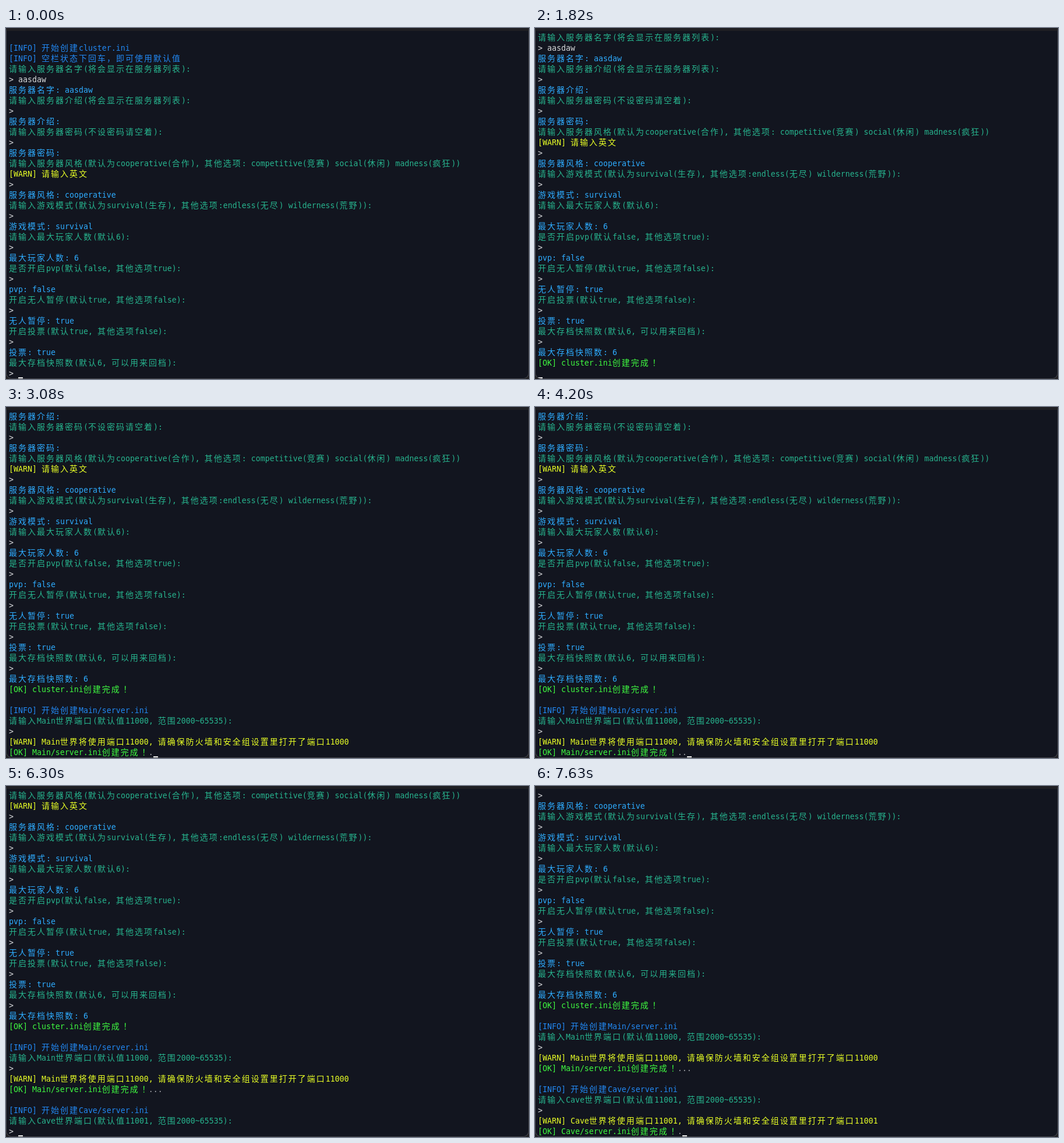
An HTML page for the animation above (8000 ms loop, 898x602 px).

```html
<!DOCTYPE html>
<html lang="zh-CN">
<head>
<meta charset="utf-8">
<style>
  html, body { margin: 0; width: 100%; height: 100%; overflow: hidden; background: #1f1f23; }
  #term {
    position: absolute; left: 0; top: 0; width: 898px; height: 602px; box-sizing: border-box;
    overflow: hidden; background: #12151f; border: 1px solid #43454b; border-top: 5px solid #1f1f23;
    border-radius: 0 0 10px 10px;
  }
  #view { position: absolute; left: 0; top: 3px; width: 896px; height: 594px; overflow: hidden; }
  #log { animation: scroll 8s step-end infinite; }
  .row {
    height: 18px; padding-left: 4px; white-space: pre;
    font: 13.288px/18px "DejaVu Sans Mono", monospace;
  }
  .row span { font: 14px/0 "Noto Sans CJK SC", "Noto Sans CJK", sans-serif; letter-spacing: 2px; }
  .row .mid { font-family: "Noto Sans CJK JP", "Noto Sans CJK", sans-serif; letter-spacing: 0; margin: 0 1px; }
  .row i { font-style: normal; color: #a2a5aa; }
  .info { color: #2288f2; }
  .ask { color: #27b48e; }
  .value { color: #2eacff; }
  .warn { color: #e8ff26; }
  .ok { color: #3ffa40; }
  .input { color: #d9dbdd; }
  #cursor {
    position: absolute; left: 4px; top: 594px; width: 8px; height: 2px; background: #e8e8e8;
    animation: cursor 8s step-end infinite;
  }
  .dot2 { animation: dot2 8s step-end infinite; }
  .dot3 { animation: dot3 8s step-end infinite; }

  @keyframes scroll {
    0% { transform: translateY(0); }
    22.75% { transform: translateY(-54px); }
    35% { transform: translateY(-108px); }
    37.625% { transform: translateY(-144px); }
    78.75% { transform: translateY(-216px); }
    94.5%, 100% { transform: translateY(-252px); }
  }
  @keyframes cursor {
    0% { transform: translateX(16px); }
    22.75% { transform: translateX(0); }
    35% { transform: translateX(16px); }
    37.625% { transform: translateX(248px); }
    52.5% { transform: translateX(256px); }
    65.625% { transform: translateX(264px); }
    78.75% { transform: translateX(16px); }
    94.5%, 100% { transform: translateX(248px); }
  }
  @keyframes dot2 { 0% { opacity: 0; } 52.5%, 100% { opacity: 1; } }
  @keyframes dot3 { 0% { opacity: 0; } 65.625%, 100% { opacity: 1; } }
</style>
</head>
<body>
<div id="term">
  <div id="view"><div id="log"></div></div>
  <div id="cursor"></div>
</div>
<script>
  // The first character of each line picks its colour; the rest is the text.
  const styles = { i: 'info', '?': 'ask', '=': 'value', '!': 'warn', '+': 'ok', '>': 'input' };

  const world = (name, port, dots) => `
i[INFO] 开始创建${name}/server.ini
?请输入${name}世界端口(默认值${port}, 范围2000~65535):
>>
![WARN] ${name}世界将使用端口${port}, 请确保防火墙和安全组设置里打开了端口${port}
+[OK] ${name}/server.ini创建完成！${dots}
`;

  const script = `
i[INFO] 开始创建cluster.ini
i[INFO] 空栏状态下回车，即可使用默认值
?请输入服务器名字(将会显示在服务器列表):
>> aasdaw
=服务器名字: aasdaw
?请输入服务器介绍(将会显示在服务器列表):
>>
=服务器介绍:
?请输入服务器密码(不设密码请空着):
>>
=服务器密码:
?请输入服务器风格(默认为cooperative(合作), 其他选项: competitive(竞赛) social(休闲) madness(疯狂))
![WARN] 请输入英文
>>
=服务器风格: cooperative
?请输入游戏模式(默认为survival(生存), 其他选项:endless(无尽) wilderness(荒野)):
>>
=游戏模式: survival
?请输入最大玩家人数(默认6):
>>
=最大玩家人数: 6
?是否开启pvp(默认false, 其他选项true):
>>
=pvp: false
?开启无人暂停(默认true, 其他选项false):
>>
=无人暂停: true
?开启投票(默认true, 其他选项false):
>>
=投票: true
?最大存档快照数(默认6, 可以用来回档):
>>
=最大存档快照数: 6
+[OK] cluster.ini创建完成！
` + world('Main', 11000, '...') + world('Cave', 11001, '.').trimEnd();

  // The Japanese form of the full-width exclamation mark sits centred in its cell.
  const markup = text => text
    .replace(/>/g, '&gt;')
    .replace(/\.+$/, dots => [...dots].map((d, n) => `<i class="dot${n + 1}">${d}</i>`).join(''))
    .replace(/[\u3000-\u9fff，]+/g, '<span>$&</span>')
    .replace(/！/g, '<span class="mid" lang="ja">！</span>');

  document.getElementById('log').innerHTML = script.split('\n')
    .map(line => `<div class="row ${styles[line[0]] || ''}">${markup(line.slice(1))}</div>`)
    .join('');
</script>
</body>
</html>
```
